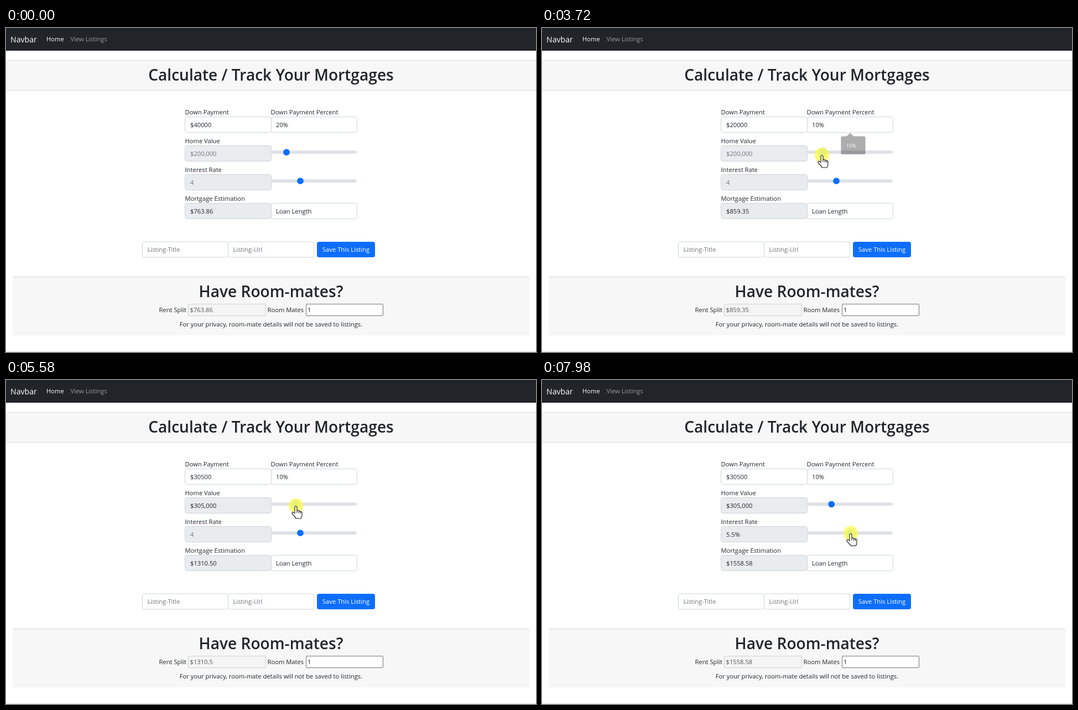
These frames come from a looping animation (958 by 585 pixels, 8000 ms). An HTML page:

```html
<!DOCTYPE html>
<html lang="en">
<head>
<meta charset="utf-8">
<title>Mortgage calculator</title>
<style>
  html, body { margin: 0; width: 100%; height: 100%; overflow: hidden; background: #fff; }
  svg { display: block; }
  text { font: 11.2px "Open Sans", "Noto Sans", sans-serif; fill: #212529; white-space: pre; }
  .h1 { font-size: 28.1px; font-weight: 600; text-anchor: middle; }
  .brand { font-size: 14.1px; fill: #fff; }
  .mid { text-anchor: middle; }
  .white { fill: #fff; }
  .dim { fill: #9b9da0; }
  .hint { fill: #6c757d; }
  .off { fill: #545454; }
  .tip { font-size: 9.1px; fill: #fff; text-anchor: middle; }
</style>
</head>
<body>
<svg id="stage" width="958" height="585" viewBox="0 0 958 585"></svg>
<script>
const LOOP = 8000, TICK = 1000 / 15;
const LEFT = 323, RIGHT = 479, TOP = 160, ROW = 52;
const stage = document.getElementById('stage');

function add(tag, attrs, parent = stage) {
  const el = document.createElementNS('http://www.w3.org/2000/svg', tag);
  for (const key in attrs) el.setAttribute(key, attrs[key]);
  parent.appendChild(el);
  return el;
}
const box = (x, y, width, height, fill, more, parent) =>
  add('rect', { x, y, width, height, fill, ...more }, parent);
function label(x, y, str, cls = '', parent) {
  const el = add('text', { x, y, class: cls }, parent);
  el.textContent = str;
  return el;
}
const field = (x, y, fill = '#fff') =>
  box(x + .5, y + .5, x === LEFT ? 156 : 155, 28, fill, { stroke: '#ced4da', rx: 4 });
const show = (el, on) => el.setAttribute('display', on ? 'inline' : 'none');
const place = (el, x, y) => el.setAttribute('transform', `translate(${x} ${y})`);
function write(el, str, cls) {
  el.textContent = str;
  if (cls !== undefined) el.setAttribute('class', cls);
}

// Navigation bar
box(0, 0, 958, 41, '#212529');
label(8, 26, 'Navbar', 'brand');
label(73, 24, 'Home', 'white');
label(116.5, 24, 'View Listings', 'dim');

// Card
box(-.5, 58.5, 959, 526, '#fff', { stroke: '#dcdcdc', rx: 4 });
box(0, 59, 958, 53, '#f7f7f7', { rx: 3 });
box(0, 112, 958, 1, '#d8d8d8');
label(479, 95, 'Calculate / Track Your Mortgages', 'h1');

// Calculator
const halo = box(477, 158, 160, 33, '#c2dbfe', { rx: 6 });
const names = ['Down Payment', 'Home Value', 'Interest Rate', 'Mortgage Estimation'];
const [downText, homeText, rateText, loanText] = names.map((name, i) => {
  const y = TOP + i * ROW;
  label(LEFT + .5, y - 4, name);
  field(LEFT, y, i ? '#e9ecef' : '#fff');
  return label(LEFT + 10, y + 19, '');
});
label(RIGHT - .5, TOP - 4, 'Down Payment Percent');
const percentBox = field(RIGHT, TOP);
const mark = box(488, 166, 23, 18, '#3390ff');
const percentText = label(488, TOP + 19, '');
field(RIGHT, TOP + 3 * ROW);
label(488, TOP + 3 * ROW + 19, 'Loan Length');

function slider(y) {
  box(480, y - 3, 154, 6, '#dee2e6', { rx: 3 });
  const g = add('g', {});
  const ring = add('circle', { r: 8.8, fill: '#c2dbfe' }, g);
  const gap = add('circle', { r: 6.8, fill: '#fff' }, g);
  const knob = add('circle', { r: 5.9 }, g);
  return (x, focus, active) => {
    place(g, x, y);
    show(ring, focus);
    show(gap, focus);
    knob.setAttribute('fill', active ? '#b6d4fe' : '#0d6efd');
  };
}
const homeSlider = slider(224.3);
const rateSlider = slider(276.2);

// Listing form
field(246, 385.5);
field(401, 385.5);
label(255.5, 404, 'Listing-Title', 'hint');
label(410.5, 404, 'Listing-Url', 'hint');
box(562, 386, 105, 28, '#0d6efd', { rx: 4 });
label(614.5, 404, 'Save This Listing', 'white mid');

// Room-mates
box(12, 449, 934, 106, '#f7f7f7');
box(12, 449, 934, 1, '#d8d8d8');
label(479, 486, 'Have Room-mates?', 'h1');
label(276.5, 513, 'Rent Split');
box(329.5, 498.5, 140, 21, '#f5f5f5', { stroke: '#d0d0d0', rx: 1.5 });
const rentText = label(332.5, 513, '', 'off');
label(472.5, 513, 'Room Mates');
box(542.5, 498.5, 139, 21, '#fff', { stroke: '#767676', rx: 1.5 });
label(545, 513, '1');
label(479, 539, 'For your privacy, room-mate details will not be saved to listings.', 'mid');

// Suggestion bubble
const bubble = add('g', {});
box(540, 196, 45, 33, '#000', { rx: 3, opacity: .15 }, bubble);
add('path', { d: 'M550 196L557 189.5L564 196Z', fill: '#29292b' }, bubble);
box(540.5, 195.5, 44, 32.5, '#29292b', { rx: 2.5 }, bubble);
label(559, 215.5, '10%', 'tip', bubble);

// Pointer
const pointer = add('g', {});
const glow = add('circle', { r: 13, fill: '#ffff28', opacity: .65 }, pointer);
const shape = (d, more) => add('path', {
  d, fill: '#fff', stroke: '#111', 'stroke-width': 1.1, 'stroke-linejoin': 'round', ...more
}, pointer);
const shapes = {
  arrow: shape('M0 0V17L4 13.2L6.6 19L9.2 17.9L6.6 12.2H12Z'),
  beam: shape('M-5 -8.5H5M0 -8V8M-5 8.5H5', { fill: 'none', 'stroke-width': 1.8 }),
  hand: shape('M-2 3a2 2 0 0 1 4 0V9Q5 7.5 5.5 10Q8 9 8.5 11Q11 10 11 13V17Q11 20 9 23H0' +
    'Q-1 20 -6.5 15Q-8 12 -5.5 11.5Q-3.5 12 -2 14Z M2 9V13M5.5 10V13.5M8.5 11V14')
};

// Pointer moves: begin, end, x, y
const moves = [
  [110, 500, 526, 187],
  [650, 960, 442, 172],
  [2310, 2640, 535, 197],
  [2660, 3500, 506, 229],
  [3720, 5650, 524, 227],
  [6050, 6320, 541, 300],
  [6510, 7000, 533, 277],
  [7380, 7950, 558, 276.5]
];
const easeOut = u => 1 - (1 - u) ** 3;

function pointerAt(t) {
  let x = 785, y = 548;
  for (const [begin, end, toX, toY] of moves) {
    if (t < begin) break;
    const k = easeOut(Math.min(1, (t - begin) / (end - begin)));
    x += (toX - x) * k;
    y += (toY - y) * k;
  }
  return [x, y];
}

const snap = (v, step) => Math.round(v / step) * step;

// Monthly payment over 30 years
function payment(loan, rate) {
  const r = rate / 1200;
  return loan * r / (1 - (1 + r) ** -360);
}

function cursorKind(x, y, held) {
  const inside = (l, t, r, b) => x > l && x < r && y > t && y < b;
  if (held || inside(480, 215, 634, 234) || inside(480, 267, 634, 286)) return 'hand';
  return inside(LEFT, TOP, 635, 189) ? 'beam' : 'arrow';
}

function render(now) {
  const t = 120 + Math.floor((now - 118) / TICK + .15) * TICK;
  const [x, y] = pointerAt(t);
  const typed = t >= 1780, left = t >= 3650, rateHeld = t >= 7380;
  const homeHeld = left && t < 6050, held = homeHeld || rateHeld;

  // Values follow the dragged knobs
  const homeX = left ? pointerAt(Math.min(t, 6040))[0] : 506;
  const home = 200 + snap((homeX - 506) * 5.85, 5);
  const rate = rateHeld ? 4 + snap((x - 533) * .064, .5) : 4;
  const down = home * (left ? 100 : 200);
  const loan = payment(home * 1000 - down, rate).toFixed(2);

  const focus = t >= 650 && !left;
  const picked = focus && !typed && x < 500;
  show(halo, focus);
  show(mark, picked);
  percentBox.setAttribute('stroke', focus ? '#86b7fe' : '#ced4da');

  write(percentText, typed ? (t >= 3250 ? '10%' : '10') : '20%', picked ? 'white' : '');
  write(downText, '$' + down);
  write(homeText, `$${home},000`, home > 200 ? '' : 'hint');
  write(rateText, rate > 4 ? rate + '%' : '4', rate > 4 ? '' : 'hint');
  write(loanText, '$' + loan);
  write(rentText, '$' + Number(loan));

  homeSlider(507 + (home - 200) * .155, left && !rateHeld, homeHeld);
  rateSlider(532 + (rate - 4) * 16.9, rateHeld, rateHeld);

  show(bubble, typed);
  bubble.setAttribute('opacity', left ? Math.max(0, .38 - (t - 3720) / 300) : 1);

  show(pointer, now >= 118);
  place(pointer, x.toFixed(1), y.toFixed(1));
  show(glow, held);
  const kind = cursorKind(x, y, held);
  for (const name in shapes) show(shapes[name], name === kind);
}

const start = performance.now();
function frame() {
  render((performance.now() - start) % LOOP);
  requestAnimationFrame(frame);
}
frame();
</script>
</body>
</html>
```
